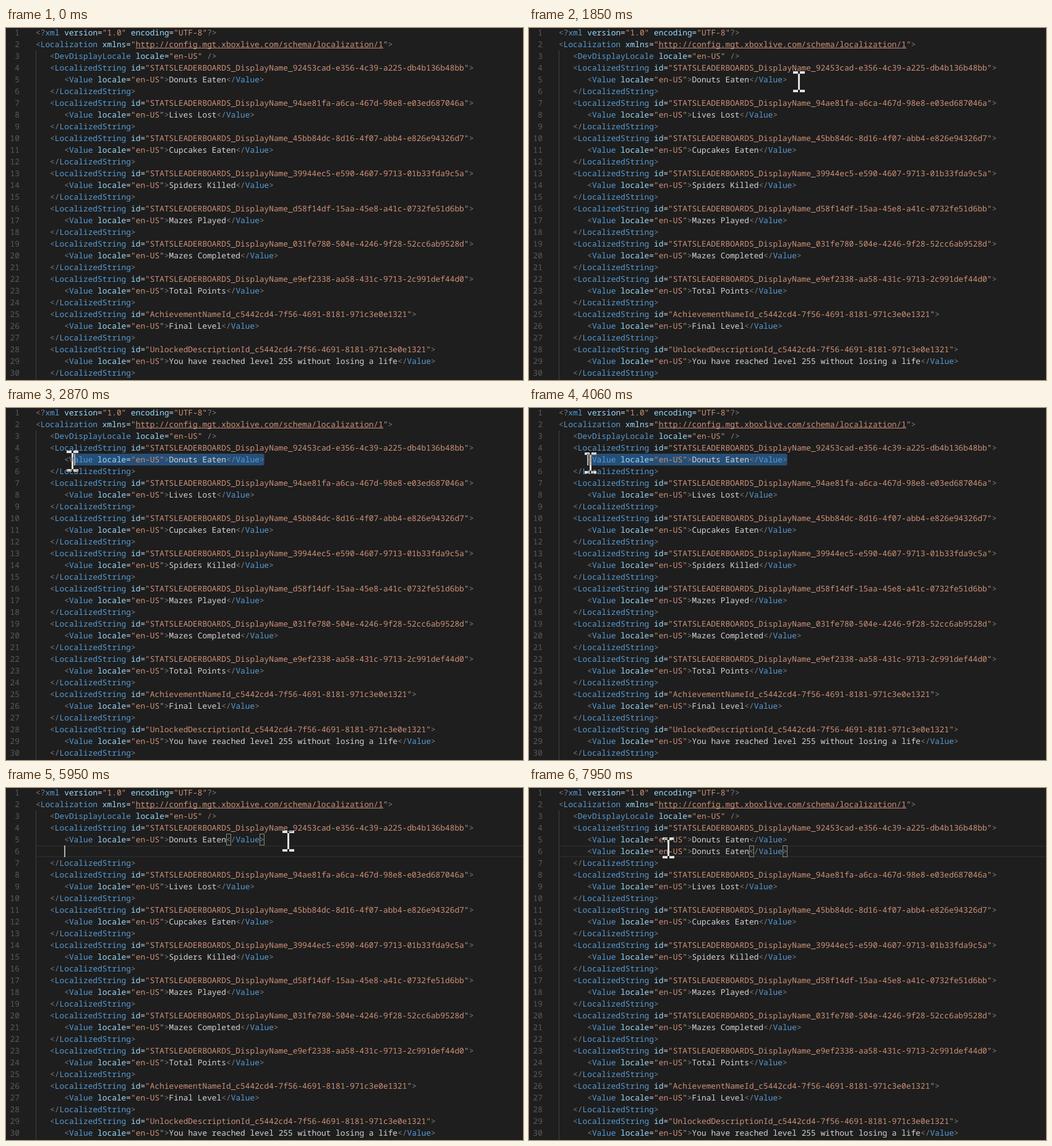
Recreate the animation shown at these times as an HTML page with a canvas. Size 836 by 570 pixels, loop 8 s.

```html
<!DOCTYPE html>
<html lang="en">
<head>
<meta charset="utf-8">
<title>Localization XML editor</title>
<style>
  html, body { margin: 0; width: 100%; height: 100%; overflow: hidden; background: #1e1e1e; }
  canvas { display: block; }
</style>
</head>
<body>
<canvas id="stage" width="836" height="570"></canvas>
<script>
const ctx = document.getElementById('stage').getContext('2d');
const LOOP = 8000, CHAR = 7.7, ROW = 19, LEFT = 48, STEP = 78.2;
const COLORS = { punct: '#808080', tag: '#569cd6', str: '#ce9178', attr: '#9cdcfe', text: '#d4d4d4' };
const TOKEN = /(?<punct><[?\/]?|[?\/]?>)|(?<tag>(?<=<[?\/]?)\w+)|(?<str>"[^"]*")|(?<attr>\w+(?==))|(?<text>(?<=>)[^<]+|=)/g;

const stat = 'STATSLEADERBOARDS_DisplayName_';
const goal = 'Id_c5442cd4-7f56-4691-8181-971c3e0e1321';
const entries = [
  [stat + '92453cad-e356-4c39-a225-db4b136b48bb', 'Donuts Eaten'],
  [stat + '94ae81fa-a6ca-467d-98e8-e03ed687046a', 'Lives Lost'],
  [stat + '45bb84dc-8d16-4f07-abb4-e826e94326d7', 'Cupcakes Eaten'],
  [stat + '39944ec5-e590-4607-9713-01b33fda9c5a', 'Spiders Killed'],
  [stat + 'd58f14df-15aa-45e8-a41c-0732fe51d6bb', 'Mazes Played'],
  [stat + '031fe780-504e-4246-9f28-52cc6ab9528d', 'Mazes Completed'],
  [stat + 'e9ef2338-aa58-431c-9713-2c991def44d0', 'Total Points'],
  ['AchievementName' + goal, 'Final Level'],
  ['UnlockedDescription' + goal, 'You have reached level 255 without losing a life'],
];
const base = [
  '<?xml version="1.0" encoding="UTF-8"?>',
  '<Localization xmlns="http://config.mgt.xboxlive.com/schema/localization/1">',
  '   <DevDisplayLocale locale="en-US" />',
  ...entries.flatMap(([id, value]) => [
    `   <LocalizedString id="${id}">`,
    `      <Value locale="en-US">${value}</Value>`,
    '   </LocalizedString>',
  ]),
];
const END = base[4].length;

// Moments of the editing session, in ms
const ENTER = 510, PRESS = 1930, DRAG_END = 3030, CLICK = 5170, NEWLINE = 5950, PASTE = 6440;
const BRACKET_DELAY = 70;
const blinkStarts = [2920, 5140, NEWLINE, 6445];

// Pointer path: time, left, top
const path = [
  [510, 639, 493], [700, 545, 290], [900, 470, 150], [1100, 438, 90], [1280, 428, 72],
  [1365, 428, 71], [1830, 428, 71], [1838, 428, 70], [2150, 300, 58], [2380, 156, 52],
  [2460, 146, 62], [2640, 117, 68], [2940, 90, 70], [3700, 90, 70], [3710, 90, 71],
  [3945, 90, 71], [3950, 90, 72], [4330, 90, 72], [4560, 240, 87], [4800, 455, 75],
  [4960, 447, 68], [5110, 447, 68], [5120, 447, 69], [6870, 447, 69], [7160, 330, 134],
  [7400, 188, 100], [7540, 203, 63], [7625, 217, 79], [7700, 217, 79], [7704, 216, 80],
];

const colX = col => LEFT + col * CHAR;
const rowY = row => row * ROW - 2;

function pointer(t) {
  t = ENTER + Math.floor((t - ENTER) / STEP) * STEP;
  const i = path.findIndex(p => p[0] > t);
  if (i < 1) return path[i < 0 ? path.length - 1 : 0].slice(1);
  const [a, b] = [path[i - 1], path[i]];
  const k = (t - a[0]) / (b[0] - a[0]);
  return [1, 2].map(n => Math.round(a[n] + (b[n] - a[n]) * k));
}

// The dragged end of the selection trails the pointer by one step
function dragHead(t) {
  const [x, y] = pointer(Math.min(t, DRAG_END) - STEP);
  const row = Math.floor((y + 19) / ROW);
  return { row, col: Math.min(Math.round((x + 7 - LEFT) / CHAR), base[row].length) };
}

function caretAt(t) {
  if (t < PRESS) return null;
  if (t < CLICK) return dragHead(t);
  if (t < NEWLINE) return { row: 4, col: END };
  return { row: 5, col: t < PASTE ? 6 : END };
}

function caretOn(t) {
  const start = blinkStarts.filter(s => s <= t).pop();
  return start === undefined || Math.floor((t - start) / 500) % 2 === 0;
}

function linesAt(t) {
  const lines = base.slice();
  if (t >= NEWLINE) lines.splice(5, 0, t < PASTE ? '' : base[4]);
  return lines.slice(0, 30);
}

function band(row, from, to, color) {
  ctx.fillStyle = color;
  ctx.beginPath();
  ctx.roundRect(colX(from), rowY(row), (to - from) * CHAR, ROW, 3);
  ctx.fill();
}

function drawSelection(lines, head) {
  if (head.row < 4) {
    band(head.row, head.col, lines[head.row].length + 1, '#264f78');
    band(4, 0, END, '#264f78');
    return;
  }
  band(4, head.col, END, '#264f78');
  const picked = lines[4].slice(head.col);
  if (picked.length < 3) return;
  lines.forEach((line, row) => {
    const col = line.indexOf(picked);
    if (row !== 4 && col >= 0) band(row, col, col + picked.length, 'rgba(173,214,255,.15)');
  });
}

function drawBrackets(row) {
  for (const col of [END - 8, END - 1]) {
    const x = Math.round(colX(col)), y = rowY(row);
    ctx.fillStyle = 'rgba(0,100,0,.1)';
    ctx.fillRect(x, y, 8, ROW);
    ctx.strokeStyle = '#888';
    ctx.strokeRect(x + .5, y + .5, 7, ROW - 1);
  }
}

function drawLine(line, row) {
  const y = rowY(row) + 14;
  ctx.fillStyle = '#5a5a5a';
  ctx.textAlign = 'right';
  ctx.fillText(row + 1, 22, y);
  ctx.textAlign = 'left';
  for (const m of line.matchAll(TOKEN)) {
    const kind = Object.keys(COLORS).find(k => m.groups[k]);
    ctx.fillStyle = COLORS[kind];
    ctx.fillText(m[0], colX(m.index), y);
    if (m[0].startsWith('"http')) ctx.fillRect(colX(m.index + 1), y + 1, (m[0].length - 2) * CHAR, 1);
  }
}

// I-beam that inverts whatever lies below it
function drawPointer([x, y]) {
  ctx.globalCompositeOperation = 'difference';
  ctx.fillStyle = '#fff';
  for (const top of [y, y + 30]) {
    ctx.fillRect(x, top, 8, 4);
    ctx.fillRect(x + 11, top, 8, 4);
  }
  ctx.fillRect(x + 8, y + 4, 3, 26);
  ctx.globalCompositeOperation = 'source-over';
}

function draw(t) {
  const lines = linesAt(t), caret = caretAt(t);
  const selecting = t >= PRESS && t < CLICK && (caret.row !== 4 || caret.col !== END);
  ctx.fillStyle = '#1e1e1e';
  ctx.fillRect(0, 0, 836, 570);

  if (caret && !selecting) {
    ctx.fillStyle = '#282828';
    ctx.fillRect(LEFT, rowY(caret.row), 788, 2);
    ctx.fillRect(LEFT, rowY(caret.row) + ROW - 2, 788, 2);
  }
  if (selecting) drawSelection(lines, caret);
  ctx.fillStyle = '#404040';
  ctx.fillRect(LEFT, rowY(2), 1, 570);

  if (t >= PASTE + BRACKET_DELAY) drawBrackets(5);
  else if (t >= CLICK + BRACKET_DELAY && t < NEWLINE + 90) drawBrackets(4);

  ctx.font = `${CHAR / .6}px "Noto Sans Mono", "Liberation Mono", monospace`;
  ctx.textRendering = 'geometricPrecision';
  lines.forEach(drawLine);

  if (caret && caretOn(t)) {
    ctx.fillStyle = '#aeafad';
    ctx.fillRect(Math.floor(colX(caret.col) + .5), rowY(caret.row), 2, ROW);
  }
  if (t >= ENTER) drawPointer(pointer(t));
}

let start;
function tick(now) {
  start ??= now;
  draw((now - start) % LOOP);
  requestAnimationFrame(tick);
}
requestAnimationFrame(tick);
</script>
</body>
</html>
```
